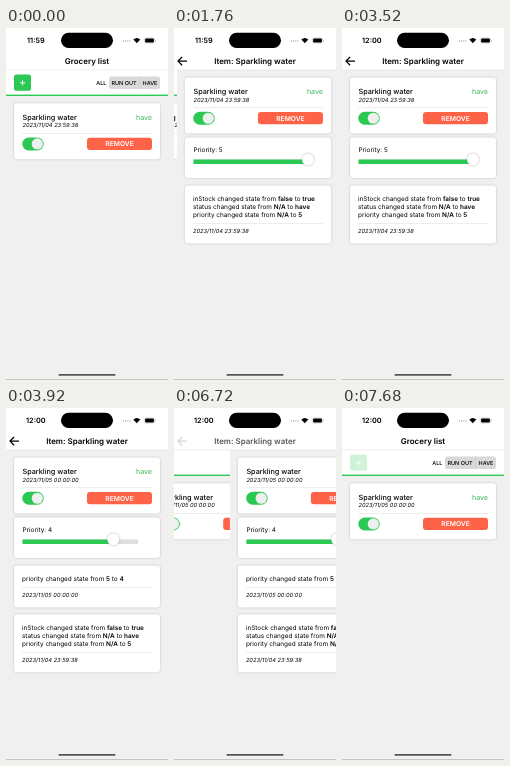
Write an HTML page that moves like this. It is 162 px wide and 352 px high and loops after 8 s.

```html
<!DOCTYPE html>
<html lang="en">
<head>
<meta charset="utf-8">
<title>Grocery list</title>
<style>
html, body { margin: 0; width: 100%; height: 100%; overflow: hidden; background: #fff; }
svg { display: block; width: 100vw; height: 100vh; }
text { font-family: Inter, "Liberation Sans", sans-serif; font-size: 6.4px; fill: #000; text-rendering: geometricPrecision; }
.card { fill: #fff; filter: drop-shadow(0 .7px .9px rgba(0,0,0,.2)); }
.name { font-size: 7.25px; font-weight: 500; }
.state { font-size: 7.1px; fill: #3cb95c; text-anchor: end; }
.date { font-size: 5.7px; font-style: italic; }
.title { font-size: 7.95px; font-weight: 600; text-anchor: middle; }
.btn { font-size: 6.7px; font-weight: 600; fill: #fff; text-anchor: middle; }
.tab { font-size: 5.5px; font-weight: 500; text-anchor: middle; }
.b { font-weight: 600; }
.knob { fill: #fff; filter: drop-shadow(0 .6px .8px rgba(0,0,0,.3)); }
</style>
</head>
<body>
<svg id="stage" viewBox="0 0 162 352" preserveAspectRatio="none"></svg>
<script>
const LOOP = 8000, STEP = 80, W = 162;
const GREEN = '#2bc853', GREY = '#f0f0f0', RED = '#ff6347';
const OLD = '2023/11/04 23:59:38', NEW = '2023/11/05 00:00:00';

const rect = (x, y, w, h, fill, r = 0, extra = '') =>
  `<rect x="${x}" y="${y}" width="${w}" height="${h}" rx="${r}" fill="${fill}" ${extra}/>`;
const text = (x, y, cls, s, extra = '') => `<text x="${x}" y="${y}" class="${cls}" ${extra}>${s}</text>`;
const card = (y, h) => rect(8, y, 146, h, '#fff', 3, 'class="card"');
const rule = y => rect(16, y, 130, .6, '#e2e2e2');
const bold = s => `<tspan class="b">${s}</tspan>`;
const change = (key, from, to) => `${key} changed state from ${bold(from)} to ${bold(to)}`;

const itemCard = (y, id) => `<g transform="translate(0 ${y})">
  ${card(0, 56)}
  <g id="${id}Head">
    ${text(16.5, 16.9, 'name', 'Sparkling water')}
    ${text(146, 16.9, 'state', 'have')}
    ${text(16.5, 24, 'date', OLD, `id="${id}Date"`)}
  </g>
  ${rule(30)}
  ${rect(16.3, 34.3, 21.4, 12.9, GREEN, 6.45)}
  <circle cx="31.3" cy="40.75" r="5.6" fill="#eef0ee"/>
  ${rect(81, 34.5, 65, 12.3, RED, 3)}
  ${text(113.5, 43.2, 'btn', 'REMOVE')}
</g>`;

const logCard = (lines, date) => {
  const n = lines.length * 8;
  return card(157.5, 34 + n) +
    lines.map((s, i) => text(16, 173.3 + i * 8, '', s)).join('') +
    rule(171.2 + n) + text(16, 181.2 + n, 'date', date);
};

const listPage = `<g id="list">
  ${rect(0, 42, W, 310, GREY)}
  ${rect(0, 42, W, 25, '#fff')}
  ${rect(0, 66.6, W, 1.4, GREEN)}
  <g id="add">
    ${rect(8, 46.4, 17, 16.4, GREEN, 2.6)}
    <path d="M14 54.8h5.2M16.6 52.2v5.2" stroke="#fff" stroke-width="1"/>
  </g>
  ${rect(103, 48.4, 51, 12.6, '#d9d9d9', 2.5)}
  ${rect(133.4, 48.4, .5, 12.6, '#c4c4c4')}
  ${text(95.3, 56.9, 'tab', 'ALL')}
  ${text(118, 56.9, 'tab', 'RUN OUT')}
  ${text(144, 56.9, 'tab', 'HAVE')}
  ${itemCard(75.2, 'list')}
</g>`;

const detailPage = `<g id="detail">
  ${rect(0, 42, W, 310, GREY)}
  ${itemCard(49.5, 'item')}
  ${card(109.5, 40.5)}
  ${text(16.5, 123.8, '', `Priority: <tspan id="level">5</tspan>`)}
  ${rect(16.5, 131.5, 115.5, 4.5, '#dedede', .5)}
  ${rect(16.5, 131.5, 115, 4.5, GREEN, .5, 'id="fill"')}
  <circle id="thumb" class="knob" cx="131" cy="131.6" r="6"/>
  <g id="newLog">${logCard([change('priority', 5, 4)], NEW)}</g>
  <g id="oldLog">${logCard([
    change('inStock', 'false', 'true'),
    change('status', 'N/A', 'have'),
    change('priority', 'N/A', 5)
  ], OLD)}</g>
</g>`;

const chrome = `
  ${rect(0, 0, W, 42, '#fff')}
  ${rect(0, 41.7, W, .5, '#dcdcdc')}
  ${text(29.8, 15.2, 'title', '11:59', 'id="clock" style="font-size:7.3px"')}
  ${rect(55, 4.7, 52, 15.2, '#000', 7.6)}
  ${[0, 1, 2, 3].map(i => `<circle cx="${117.6 + i * 2.1}" cy="13" r=".65" fill="#aaa"/>`).join('')}
  <path d="M130.8 15.2L127.3 11.6Q130.8 8.6 134.3 11.6Z"/>
  ${rect(138.3, 9.9, 10.4, 5.2, '#fff', 1.6, 'stroke="#aaa" stroke-width=".45"')}
  ${rect(139.1, 10.6, 8.8, 3.8, '#000', 1)}
  ${rect(149.3, 11.7, .6, 1.6, '#aaa', .3)}
  ${text(81, 36.4, 'title', 'Grocery list', 'id="listTitle"')}
  ${text(81, 36.4, 'title', 'Item: Sparkling water', 'id="itemTitle"')}
  <path id="back" d="M13 33.1H4.2M8.1 29L4 33.1L8.1 37.2" fill="none" stroke="#000" stroke-width="1.25"/>
  ${rect(52.5, 346, 57, 1.8, '#555', .9)}
  ${rect(0, 351.2, W, .8, '#bbb')}`;

const stage = document.getElementById('stage');
stage.innerHTML = listPage + detailPage + chrome;
const el = {};
stage.querySelectorAll('[id]').forEach(n => el[n.id] = n);

const clamp = v => Math.max(0, Math.min(1, v));
// Critically damped spring, as used by the page slide
const spring = ms => {
  const u = Math.max(0, ms) * .0197;
  return 1 - (1 + u) * Math.exp(-u);
};
const set = (n, k, v) => n.setAttribute(k, v);
const label = (n, s) => { if (n.textContent !== s) n.textContent = s; };

function draw(time) {
  const t = Math.floor(time / STEP) * STEP;
  const popping = t >= 6720;
  let open = 0;
  if (popping) open = t > 7200 ? 0 : 1 - spring(t - 6658);
  else if (t >= 1440) open = t > 1920 ? 1 : Math.max(.02, spring(t - 1458.5));

  set(el.list, 'transform', `translate(${-.3 * W * open} 0)`);
  set(el.detail, 'transform', `translate(${W * (1 - open)} 0)`);
  set(el.detail, 'visibility', open ? 'visible' : 'hidden');
  set(el.itemTitle, 'opacity', open);
  set(el.listTitle, 'opacity', popping ? clamp(1 - open / .6) : 1 - open);
  set(el.back, 'opacity', t >= 5200 ? .25 * open : clamp(open * 1.3));

  set(el.listHead, 'opacity', t >= 720 && t < 1760 ? .3 : 1);
  set(el.add, 'opacity', t >= 7680 ? .22 : 1);
  label(el.clock, t < 2720 ? '11:59' : '12:00');

  const x = 131 - 23.7 * clamp((t - 3520) / 160);
  set(el.thumb, 'cx', x);
  set(el.fill, 'width', x - 16.5);
  label(el.level, t < 3600 ? '5' : '4');

  const saved = t >= 3680;
  label(el.listDate, saved ? NEW : OLD);
  label(el.itemDate, saved ? NEW : OLD);
  set(el.newLog, 'visibility', saved && open ? 'visible' : 'hidden');
  set(el.oldLog, 'transform', `translate(0 ${saved ? 48.7 : 0})`);
}

const start = performance.now();
function tick() {
  draw((performance.now() - start) % LOOP);
  requestAnimationFrame(tick);
}
tick();
</script>
</body>
</html>
```
